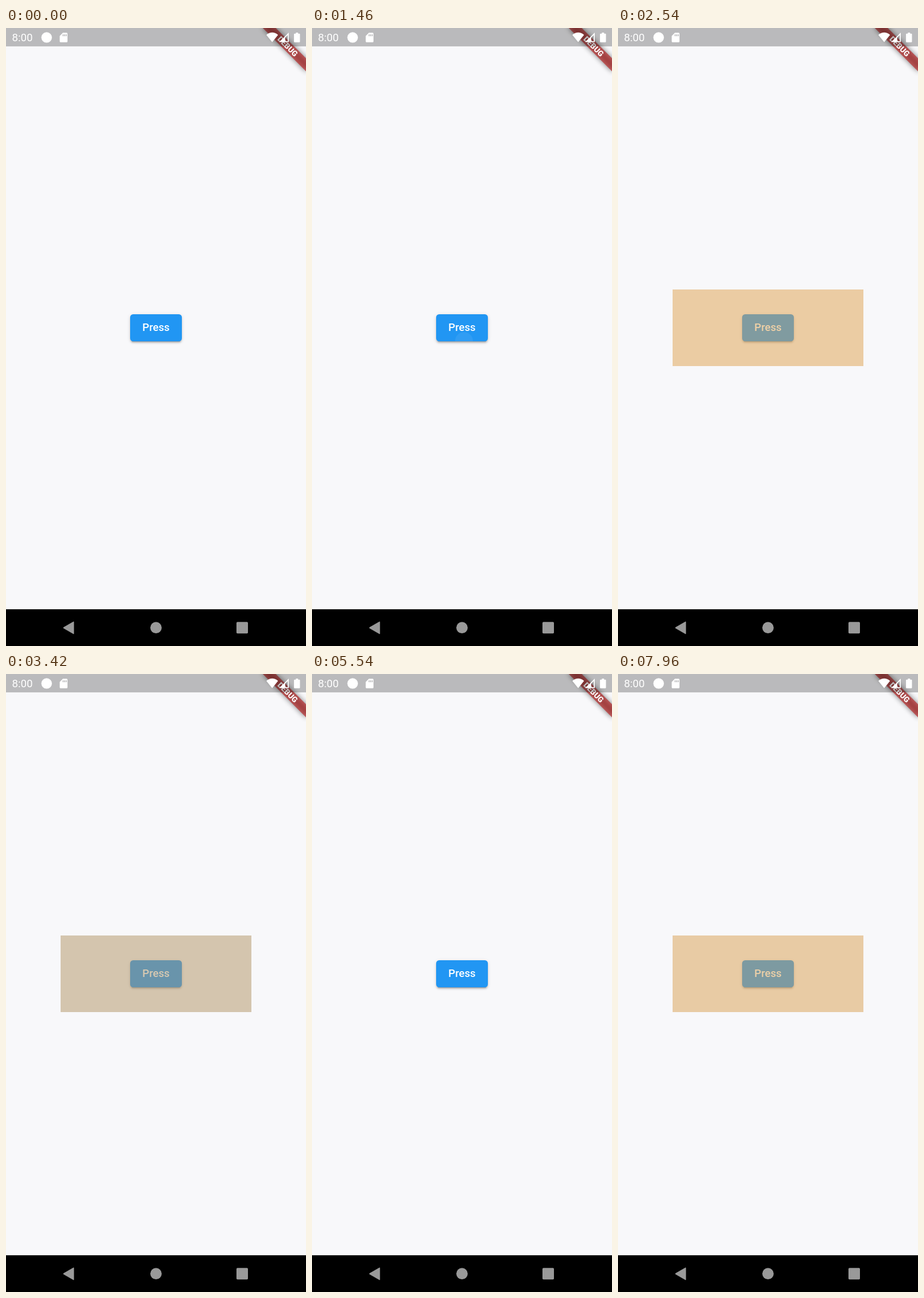
Write an HTML page that moves like this. It is 522 px wide and 1073 px high and loops after 8000 ms.

```html
<!DOCTYPE html>
<html lang="en">
<head>
<meta charset="utf-8">
<title>Press overlay</title>
<style>
  html, body { margin: 0; width: 100%; height: 100%; overflow: hidden; background: #f8f8fa; }
  #stage { position: relative; width: 522px; height: 1073px; overflow: hidden; font-family: Roboto, sans-serif; }
  #stage > * { position: absolute; }
  svg { left: 0; top: 0; }
  #button {
    left: 215.8px; top: 496.6px; width: 90.4px; height: 47.8px; border-radius: 5.3px;
    background: #2196f3; color: #fff; font-size: 18.6px; font-weight: 500;
    line-height: 47.8px; text-align: center;
  }
  #clip { position: absolute; inset: 0; overflow: hidden; border-radius: inherit; }
  #ripple { position: absolute; border-radius: 50%; background: rgba(255, 255, 255, .24); }
  #label { position: relative; }
  #overlay { left: 94.9px; top: 454px; width: 332.2px; height: 132.9px; }
</style>
</head>
<body>
<div id="stage">
  <div id="button"><div id="clip"><div id="ripple"></div></div><span id="label">Press</span></div>
  <div id="overlay"></div>
  <svg width="522" height="1073" viewBox="0 0 522 1073">
    <defs>
      <filter id="soft" x="-20%" y="-150%" width="140%" height="400%"><feGaussianBlur stdDeviation="5"/></filter>
    </defs>
    <!-- corner banner -->
    <g transform="translate(522 0) rotate(45)">
      <rect x="-53.2" y="37.2" width="106.4" height="16" fill="#000" opacity=".5" filter="url(#soft)"/>
      <rect x="-53.2" y="37.2" width="106.4" height="16" fill="#b71c1c" opacity=".627"/>
      <text y="49.9" fill="#fff" font-size="13.5" font-weight="900" text-anchor="middle">DEBUG</text>
    </g>
    <!-- status bar -->
    <rect width="522" height="31.9" opacity=".25"/>
    <g fill="#fff">
      <text x="10.5" y="23" font-size="18.6">8:00</text>
      <circle cx="70.7" cy="16.4" r="9.2"/>
      <path fill-rule="evenodd" d="M99 8.3h6.4q1.6 0 1.6 1.6v13.3q0 1.6-1.6 1.6H95.1q-1.6 0-1.6-1.6v-9.4zM98.6 11v3.2h1.6V11zM101.3 11v3.2h1.6V11zM104 11v3.2h1.6V11z"/>
      <path d="M463.2 24.6L453 11.9q10.2-8.2 20.4 0z"/>
      <path fill-rule="evenodd" d="M492 8v16.6h-16.6zM490.3 12.2l-4.6 4.6v6.1h4.6z"/>
      <path d="M504.4 9.7V8h3.8v1.7h2q1.3 0 1.3 1.3v12.5q0 1.3-1.3 1.3h-7.8q-1.3 0-1.3-1.3V11q0-1.3 1.3-1.3z"/>
    </g>
    <!-- navigation bar -->
    <rect y="1009.2" width="522" height="64"/>
    <g fill="#999">
      <path d="M100 1040.6L117 1030.7q1.3-.7 1.3.7v20q0 1.4-1.3.7L100 1042.2q-1-.8 0-1.6z"/>
      <circle cx="261" cy="1041.2" r="9.9"/>
      <rect x="401" y="1031.3" width="20" height="20" rx="1.8"/>
    </g>
  </svg>
</div>
<script>
const LOOP = 8000;
const OVERLAY_MS = 3000, LINGER_MS = 30;
const PRESSES = [{ down: 1440, up: 1945 }, { down: 6760, up: 7265 }];
const FROM = [255, 171, 64], TO = [96, 125, 139];
const TOUCH = [48.8, 47.5], CENTER = [45.2, 23.9];
// y, blur, spread and alpha of each shadow layer, resting and raised
const REST = [[4, 1.3, -2.7, .2], [2.7, 2.7, 0, .14], [1.3, 6.6, 0, .12]];
const RAISED = [[6.6, 6.6, -4, .2], [10.6, 13.3, 1.3, .14], [4, 18.6, 2.7, .12]];

const byId = id => document.getElementById(id);
const button = byId('button'), ripple = byId('ripple'), overlay = byId('overlay');
const clamp = v => Math.min(1, Math.max(0, v));
const mix = (a, b, k) => a + (b - a) * k;
const mixAll = (a, b, k) => a.map((v, i) => mix(v, b[i], k));

function bezier(x1, y1, x2, y2) {
  const at = (a, b, s) => 3 * a * s * (1 - s) ** 2 + 3 * b * s * s * (1 - s) + s ** 3;
  return x => {
    let lo = 0, hi = 1;
    for (let i = 0; i < 24; i++) {
      const mid = (lo + hi) / 2;
      if (at(x1, x2, mid) < x) lo = mid; else hi = mid;
    }
    return at(y1, y2, (lo + hi) / 2);
  };
}
const ease = bezier(.25, .1, .25, 1);
const fastOutSlowIn = bezier(.4, 0, .2, 1);

function drawShadow(t, { down, up }) {
  const lift = fastOutSlowIn(clamp((t - down) / 200)) * (1 - fastOutSlowIn(clamp((t - up) / 200)));
  button.style.boxShadow = REST.map((layer, i) => {
    const [y, blur, spread, alpha] = mixAll(layer, RAISED[i], lift);
    return `0 ${y}px ${blur}px ${spread}px rgba(0,0,0,${alpha})`;
  }).join();
}

function drawRipple(t, { down, up }) {
  const held = Math.max(0, Math.min(t, up) - down) / 1000;
  const k = ease(clamp(held + Math.max(0, t - up) / 225));
  const r = mix(15.3, 57.8, k);
  const [x, y] = mixAll(TOUCH, CENTER, k);
  Object.assign(ripple.style, {
    left: x - r + 'px', top: y - r + 'px', width: 2 * r + 'px', height: 2 * r + 'px',
    opacity: clamp((t - down) / 75) * (1 - clamp((t - up - 225) / 150))
  });
}

function drawOverlay(t, { up }) {
  const age = t - up;
  const shown = age >= 0 && age < OVERLAY_MS + LINGER_MS;
  overlay.style.display = shown ? 'block' : 'none';
  overlay.style.background = `rgba(${mixAll(FROM, TO, clamp(age / OVERLAY_MS)).map(Math.round)},.5)`;
}

const start = performance.now();
function draw() {
  const t = (performance.now() - start) % LOOP;
  const press = t < PRESSES[1].down ? PRESSES[0] : PRESSES[1];
  drawShadow(t, press);
  drawRipple(t, press);
  drawOverlay(t, press);
  requestAnimationFrame(draw);
}
draw();
</script>
</body>
</html>
```
